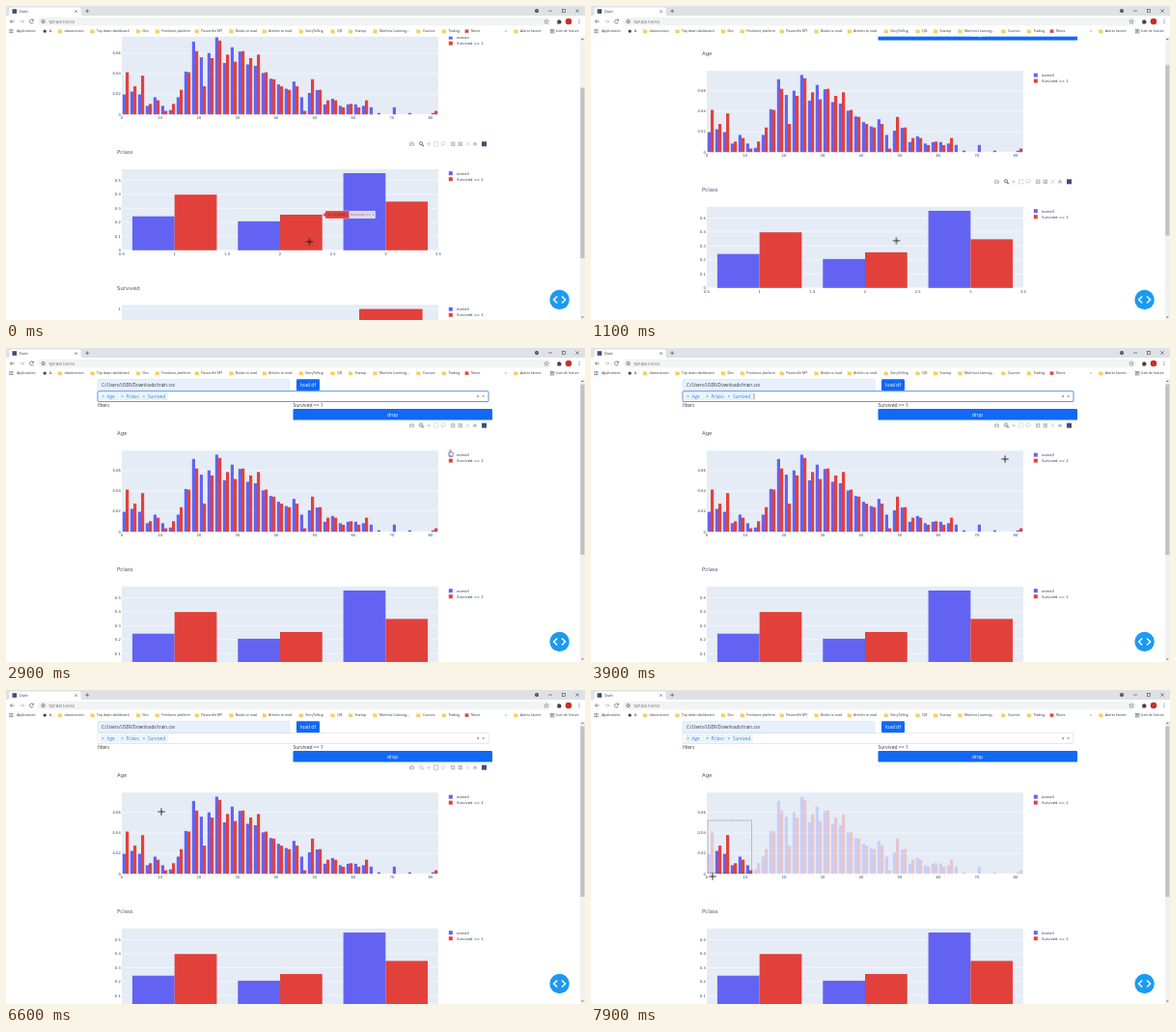
An HTML page that plays this animation: 600x325 px, repeating every 8 s.

```html
<!DOCTYPE html>
<html lang="en">
<head>
<meta charset="utf-8">
<title>Dash</title>
<style>
html, body { margin: 0; width: 100%; height: 100%; overflow: hidden; background: #fff; }
svg { display: block; width: 600px; height: 325px; }
text { font-family: "Open Sans", "Noto Sans", sans-serif; fill: #333; white-space: pre; }
.plot text { font-family: "DejaVu Sans", sans-serif; font-size: 3.75px; fill: #2a3f5f; }
.plot .title { font-size: 5.4px; fill: #4a5872; }
.end { text-anchor: end; }
.mid { text-anchor: middle; }
.grid { stroke: #fff; stroke-width: .5; }
.bm text { font-size: 3.4px; }
.line { fill: none; stroke: #444; stroke-width: .6; }
.icon { opacity: .35; }
.icon.on { opacity: .8; }
.tag { fill: #ebf5ff; stroke: #c2e0ff; stroke-width: .35; }
.form text { font-size: 4.6px; }
.form .tagText { fill: #2f86e8; }
.form .btnText { font-size: 5px; fill: #fff; }

/* one pass of the recording lasts 8 s */
.a { animation: 8s linear infinite; }
.step { animation-timing-function: step-end; }
#page { animation-name: scroll; }
#thumb { animation-name: thumb; }
#hover { animation-name: hover; }
#bar0 { animation-name: bar0; }
#bar1 { animation-name: bar1; }
#focus { animation-name: focus; }
#caret { animation-name: caret; }
#tip { animation-name: tip; }
#bar0 .zoom { animation: toolOff 8s step-end infinite; }
#bar0 .box { animation: toolOn 8s step-end infinite; }
#cursor { animation-name: move; }
#cross { animation-name: cross; }
#arrow { animation-name: arrow; }
#hand { animation-name: hand; }

@keyframes scroll {
  0% { transform: translateY(-78px); }
  6.25% { transform: translateY(-78px); animation-timing-function: ease-in-out; }
  8.1% { transform: translateY(-39px); }
  14.4% { transform: translateY(-39px); animation-timing-function: ease-in-out; }
  16.25%, 100% { transform: none; }
}
@keyframes thumb {
  0% { transform: translateY(47px); }
  6.25% { transform: translateY(47px); animation-timing-function: ease-in-out; }
  8.1% { transform: translateY(23.5px); }
  14.4% { transform: translateY(23.5px); animation-timing-function: ease-in-out; }
  16.25%, 100% { transform: none; }
}
@keyframes hover { 0% { opacity: 1; } 6.25%, 100% { opacity: 0; } }
@keyframes bar1 { 0%, 20% { opacity: 1; } 22.4%, 100% { opacity: 0; } }
@keyframes bar0 { 0%, 22.5% { opacity: 0; } 25%, 91.25% { opacity: 1; } 92.5%, 100% { opacity: 0; } }
@keyframes focus { 0% { opacity: 1; } 58%, 100% { opacity: 0; } }
@keyframes caret {
  0%, 9.6%, 22.9%, 35.9%, 49.4%, 58%, 100% { opacity: 0; }
  3%, 16.25%, 29.5%, 42.75%, 56% { opacity: 1; }
}
@keyframes tip { 0%, 62.5%, 100% { opacity: 0; } 55.5% { opacity: 1; } }
@keyframes toolOff { 0% { opacity: .8; } 58%, 100% { opacity: .35; } }
@keyframes toolOn { 0% { opacity: .35; } 55.5%, 100% { opacity: .8; } }
@keyframes move {
  0% { transform: translate(314.5px, 244px); }
  13.75%, 16.9% { transform: translate(316.5px, 243px); }
  20% { transform: translate(382.5px, 204.3px); }
  22.5% { transform: translate(384px, 192px); }
  23.75% { transform: translate(386px, 186px); }
  30% { transform: translate(448px, 114px); }
  32.5%, 37.5% { transform: translate(460.5px, 105.7px); }
  41.2% { transform: translate(447px, 118px); }
  46.25% { transform: translate(426px, 124px); }
  51.25% { transform: translate(432px, 106px); }
  55.6%, 61.5% { transform: translate(446.5px, 81px); }
  63.75% { transform: translate(404px, 106px); }
  68% { transform: translate(270px, 121px); }
  78.75% { transform: translate(166px, 125px); }
  82.5% { transform: translate(161px, 126px); }
  87% { transform: translate(148px, 128px); }
  91.25% { transform: translate(166.5px, 135px); }
  98.75%, 100% { transform: translate(126px, 193px); }
}
@keyframes cross {
  0%, 23.4%, 41.2%, 63.75%, 100% { opacity: 1; }
  17.5%, 30%, 51.25% { opacity: 0; }
}
@keyframes arrow {
  0%, 23.4%, 31.9%, 41.2%, 54.4%, 63.75%, 100% { opacity: 0; }
  17.5%, 30%, 38.7%, 51.25%, 62% { opacity: 1; }
}
@keyframes hand {
  0%, 38.7%, 62%, 100% { opacity: 0; }
  31.9%, 54.4% { opacity: 1; }
}
</style>
</head>
<body>
<svg id="stage" viewBox="0 0 600 325"></svg>
<script>
const BLUE = '#6363f3', RED = '#e2413b', LEFT = 120, WIDTH = 328, HEIGHT = 84;
const LOOP = 8000, DRAG = 7300, DROP = 7900;

const rect = (x, y, w, h, fill, more = '') =>
  `<rect x="${x}" y="${y}" width="${w}" height="${h}" fill="${fill}" ${more}/>`;
const text = (x, y, s, cls = '', more = '') => `<text x="${x}" y="${y}" class="${cls}" ${more}>${s}</text>`;
const line = (d, more = '') => `<path class="line" d="${d}" ${more}/>`;
const steps = (from, to, by) =>
  Array.from({ length: Math.round((to - from) / by) + 1 }, (_, i) => +(from + i * by).toFixed(2));
const share = counts => {
  const sum = counts.reduce((a, b) => a + b);
  return counts.map(c => c / sum);
};

// passengers per two-year age bin
const ages = share([14, 16, 14, 6, 12, 6, 3, 12, 30, 51, 40, 43, 54, 36, 47, 44, 35, 34, 29, 25, 21,
  18, 23, 12, 15, 17, 7, 11, 6, 7, 7, 6, 5, 1, 0, 5, 0, 1, 0, 0, 1]);
const agesAlive = share([12, 8, 11, 3, 4, 1, 3, 7, 12, 18, 8, 16, 21, 17, 15, 18, 16, 17, 12, 10, 8,
  7, 8, 1, 10, 7, 4, 4, 2, 3, 2, 4, 0, 0, 0, 0, 0, 0, 0, 0, 1]);

const charts = [
  { title: 'Age', x0: 0, x1: 82, first: 1, bin: 2, xTicks: steps(0, 80, 10), yTicks: steps(0, .06, .02),
    data: [ages, agesAlive] },
  { title: 'Pclass', x0: .5, x1: 3.5, first: 1, bin: 1, xTicks: steps(.5, 3.5, .5), yTicks: steps(0, .5, .1),
    data: [share([216, 184, 491]), share([136, 87, 119])] },
  { title: 'Survived', x0: -.5, x1: 1.5, first: 0, bin: 1, xTicks: steps(-.5, 1.5, .5), yTicks: steps(0, 1, .2),
    data: [share([549, 342]), [0, 1]] },
];

function chart(c, i) {
  const top = 106.2 + 140.6 * i, base = top + HEIGHT;
  const unit = WIDTH / (c.x1 - c.x0);
  const scale = HEIGHT * .95 / Math.max(...c.data.flat());
  const px = v => LEFT + (v - c.x0) * unit;
  const half = .4 * c.bin * unit;
  const bars = c.data.map((vals, s) => vals.map((v, k) =>
    v && rect(px(c.first + k * c.bin) - (s ? 0 : half), base - v * scale, half, v * scale,
      s ? RED : BLUE, 'class="bar"') || '').join('')).join('');
  const yAxis = c.yTicks.map(v => {
    const y = base - v * scale;
    return `<path class="grid" d="M${LEFT} ${y}h${WIDTH}"/>` + text(118.8, y + 1.3, v, 'end');
  }).join('');
  const xAxis = c.xTicks.map(v => text(px(v), base + 4.7, v, 'mid')).join('');
  const legend = ['overall', 'Survived == 1'].map((s, k) =>
    rect(458.8, top + 2.4 + 6 * k, 4, 4, k ? RED : BLUE) + text(467, top + 5.7 + 6 * k, s)).join('');
  return `<g class="plot" id="chart${i}">` + text(115, top - 15.8, c.title, 'title') +
    rect(LEFT, top, WIDTH, HEIGHT, '#e5ecf6') + yAxis + bars + xAxis + legend + '</g>';
}

const tools = [
  [420.5, 'cam', '<path d="M-2.5-1.4h1.3l.5-.8h1.4l.5.8h1.3V2h-5z" fill="#444"/><circle r="1" cy=".3" fill="#fff"/>'],
  [430.5, 'zoom on', '<circle class="line" cx="-.5" cy="-.5" r="1.6" style="stroke-width:.9"/>' +
    line('M.7.7 2.4 2.4', 'style="stroke-width:1.1"')],
  [438, 'pan', line('M-2.4 0H2.4M0-2.4V2.4')],
  [445.7, 'box', rect(-2.2, -2.2, 4.4, 4.4, 'none', 'stroke="#444" stroke-width=".7" stroke-dasharray="1.1 .5"')],
  [453.2, 'lasso', '<ellipse class="line" rx="2.3" ry="1.6" cy="-.6"/>' + line('M-1.3.7Q-2.3 1.5-1 2.4')],
  [463.2, 'in', rect(-2.2, -2.2, 4.4, 4.4, '#444') + line('M-1.4 0H1.4M0-1.4V1.4', 'style="stroke:#fff"')],
  [470.8, 'out', rect(-2.2, -2.2, 4.4, 4.4, '#444') + line('M-1.4 0H1.4', 'style="stroke:#fff"')],
  [478.4, 'auto', line('M-2.1-2.1 2.1 2.1M2.1-2.1-2.1 2.1')],
  [486, 'home', '<path d="M-2.4.2 0-2.2 2.4.2H1.7V2H.5V.7H-.5V2H-1.7V.2z" fill="#444"/>'],
];
const modebar = i => `<g id="bar${i}" class="a">` + tools.map(([x, cls, art]) =>
  `<g transform="translate(${x} ${80.2 + 140.6 * i})"><g class="icon ${cls}">${art}</g></g>`).join('') +
  rect(493, 77.7 + 140.6 * i, 5, 5, '#3f4f75') + '</g>';

const tag = (x, w, s) => rect(x, 46.5, w, 7.4, '', 'rx=".6" class="tag"') +
  text(x + 1.3, 51.7, '×', 'tagText') + text(x + 6.6, 51.8, s, 'tagText');

const form = '<g class="form">' +
  rect(95, 32.4, 199, 11.8, '#e8f0fe', 'stroke="#ced4da" stroke-width=".4" rx=".8"') +
  text(99, 40, 'C:/Users/USER/Downloads/train.csv') +
  rect(301, 32.2, 24, 12, '#1168f5', 'rx="1.2"') + text(313, 40, 'load df', 'btnText mid') +
  rect(95, 44.7, 405, 10.8, '#fff', 'stroke="#ccc" stroke-width=".5" rx="1"') +
  '<g id="focus" class="a step">' +
  rect(95, 44.7, 405, 10.8, 'none', 'stroke="#3f86e6" stroke-width=".8" rx="1"') + '</g>' +
  tag(98, 18.5, 'Age') + tag(118, 21, 'Pclass') + tag(140.3, 27, 'Survived') +
  '<path id="caret" class="a step" d="M169 47v6.4" stroke="#222" stroke-width=".5"/>' +
  text(489, 51.7, '×', 'mid') + '<path d="M493.2 49.4h3l-1.5 1.7z" fill="#777"/>' +
  text(95, 60.7, 'filters') + text(297.5, 60.8, 'Survived == 1', '', 'style="font-size:5px"') +
  rect(297.5, 63, 206.5, 11.6, '#1168f5', 'rx="1.2"') + text(400.5, 70.6, 'drop', 'btnText mid') + '</g>';

const hover = '<g id="hover" class="a step plot">' +
  `<path d="M328 294l3-2.2V290h24.5v8H331v-1.8z" fill="${RED}" stroke="#fff" stroke-width=".3"/>` +
  rect(355.8, 290, 27, 8, '#dcdcf0') +
  text(343.2, 295.3, '(2, 0.2544)', 'mid', 'style="font-size:3.4px;fill:#444"') +
  text(369.3, 295.3, 'Survived == 1', 'mid', `style="font-size:3.35px;fill:${RED}"`) + '</g>';

const tip = '<g id="tip" class="a step">' + rect(425, 84, 26.3, 8, '#555c73', 'rx=".6"') +
  text(438.2, 89.4, 'Box Select', 'mid', 'style="font-size:3.9px;fill:#fff"') + '</g>';

const folders = [[56, 'datasciences'], [89.5, 'Top down dashboard'], [137, 'Dev'], [156.7, 'Freelance platform'],
  [197.7, 'Passerelle MY'], [233.4, 'Books to read'], [267.7, 'Articles to read'], [305.7, 'StoryTelling'],
  [338.5, 'CJB'], [357, 'Startup'], [382.4, 'Machine Learning...'], [427.3, 'Courses'], [453.8, 'Trading'],
  [528.3, 'Autres favoris']];
const folder = ([x, s]) => `<path d="M${x - 2} 24.2h1.6l.5.6h2.1v3.4h-4.2z" fill="#f6cf60"/>` + text(x + 4.6, 27.4, s);

const chrome = rect(0, 0, 600, 31.6, '#fff') + rect(0, 0, 600, 10, '#dee1e6') +
  '<path d="M2 10Q3.5 10 3.5 8V3Q3.5 1.5 5 1.5H76Q77.5 1.5 77.5 3V8Q77.5 10 79 10z" fill="#fff"/>' +
  rect(6.5, 3.2, 4.6, 4.6, '#3f4f75') + text(14, 6.9, 'Dash', '', 'style="font-size:3.7px"') +
  line('M71.4 4.4l2.4 2.4m0-2.4-2.4 2.4M82.2 5.2h4m-2-2v4M562 5h4M590.3 3.3l3.4 3.4m0-3.4-3.4 3.4') +
  '<circle cx="550" cy="5" r="2" fill="#444"/><path d="M549.2 4.6h1.6l-.8 1z" fill="#fff"/>' +
  rect(576.4, 3.4, 3.2, 3.2, 'none', 'stroke="#444" stroke-width=".6"') +
  line('M8.6 16H4.4l1.8-1.8M4.4 16l1.8 1.8') +
  line('M14.4 16h4.2l-1.8-1.8M18.6 16l-1.8 1.8', 'style="stroke:#aaa"') +
  line('M28.2 14.9a2 2 0 1 0 .2 1.8M28.5 13.6v1.6h-1.6') +
  rect(33, 11.7, 532, 8.6, '#f1f3f4', 'rx="4.3"') +
  '<circle class="line" cx="38.6" cy="16" r="1.7"/>' + line('M38.6 15.8v1M38.6 15v.3') +
  text(44, 17.5, '127.0.0.1:<tspan fill="#777">8050</tspan>', '', 'style="font-size:4px"') +
  line('M560 13.8l.7 1.5 1.6.2-1.2 1.1.3 1.6-1.4-.8-1.4.8.3-1.6-1.2-1.1 1.6-.2z', 'style="stroke-width:.4"') +
  '<path d="M571.3 14.7h1.2a.7.7 0 1 1 1.4 0h1.2v1.2a.7.7 0 1 1 0 1.4v1.1h-3.8z" fill="#444"/>' +
  '<circle cx="583" cy="16" r="3.3" fill="#c9302c"/>' +
  [14.3, 16, 17.7].map(y => `<circle cx="594" cy="${y}" r=".5" fill="#555"/>`).join('') +
  '<g class="bm">' +
  [0, 1, 2].map(r => ['#e2574c', '#4a8cf0', '#46a35a'].map((f, c) =>
    rect(3.3 + c * 1.5, 24 + r * 1.5, 1.1, 1.1, f)).join('')).join('') +
  text(11.2, 27.4, 'Applications') +
  '<circle cx="40.2" cy="26.1" r="1.7" fill="#444"/>' + text(45, 27.4, 'A-') +
  folders.map(folder).join('') +
  rect(475.6, 24.4, 3.8, 3.4, '#d9473d') + text(482, 27.4, 'Notes') + text(517, 27.3, '»') +
  rect(564.2, 24.2, 3.8, 3.8, 'none', 'stroke="#555" stroke-width=".5"') + line('M565 25.4h2.2M565 26.8h2.2') +
  text(569.8, 27.4, 'Liste de lecture') + '</g>';

const scrollbar = rect(594.8, 31.6, 5.2, 294, '#f1f1f1') +
  '<path d="M596 35l1.4-1.6 1.4 1.6zM596 321.5l1.4 1.6 1.4-1.6z" fill="#666"/>' +
  `<g id="thumb" class="a">${rect(595.3, 37.6, 4.2, 176.5, '#c1c1c1')}</g>`;

const devButton = '<circle cx="573.6" cy="304" r="10.2" fill="#1c9af2"/>' +
  line('M571.2 300.6l-3.6 3.4 3.6 3.4M576 300.6l3.6 3.4-3.6 3.4', 'style="stroke:#fff;stroke-width:1.4"');

const cursor = '<g id="cursor" class="a">' +
  '<path id="cross" class="a step" d="M-3.7 0H3.7M0-3.7V3.7" stroke="#111" stroke-width=".85"/>' +
  '<g fill="#fff" stroke="#222" stroke-width=".5">' +
  '<path id="arrow" class="a step" d="M0 0V5.4L1.2 4.3 2.1 6.2 2.9 5.8 2 4H3.7z"/>' +
  '<path id="hand" class="a step" d="M-.6 0V3.2L-1.6 2.6-2.2 3.2-.4 6.2H2.6L3.2 2.9Q2.4 2 .6 2.3V0Q0-.8-.6 0z"/></g></g>';

const marquee = '<rect id="marquee" fill="none" stroke="#555" stroke-width=".55" stroke-dasharray="1 .7"/>';

document.getElementById('stage').innerHTML =
  `<g id="page" class="a">${form}${charts.map(chart).join('')}${modebar(0)}${modebar(1)}${hover}${tip}${marquee}</g>` +
  chrome + scrollbar + devButton + cursor;

const box = document.getElementById('marquee');
const bars = [...document.querySelectorAll('#chart0 .bar')].map(el => ({
  el,
  mid: el.x.baseVal.value + el.width.baseVal.value / 2,
  top: el.y.baseVal.value,
}));

// box selection: bars whose top centre lies outside the box fade
let start;
function draw(now) {
  start ??= now;
  const t = (now - start) % LOOP;
  const dragging = t >= DRAG;
  const p = Math.min(1, Math.max(0, (t - DRAG) / (DROP - DRAG)));
  const right = 166.5, top = 135;
  const left = right - 45.5 * p, bottom = Math.min(189.4, top + 58 * p);
  box.style.display = dragging ? '' : 'none';
  box.setAttribute('x', left);
  box.setAttribute('y', top);
  box.setAttribute('width', right - left);
  box.setAttribute('height', bottom - top);
  const reach = right - 40 * p;
  for (const b of bars) {
    const inside = b.mid >= reach && b.mid <= right && b.top >= top && b.top <= bottom;
    b.el.style.opacity = !dragging || inside ? 1 : .22;
  }
  requestAnimationFrame(draw);
}
requestAnimationFrame(draw);
</script>
</body>
</html>
```
